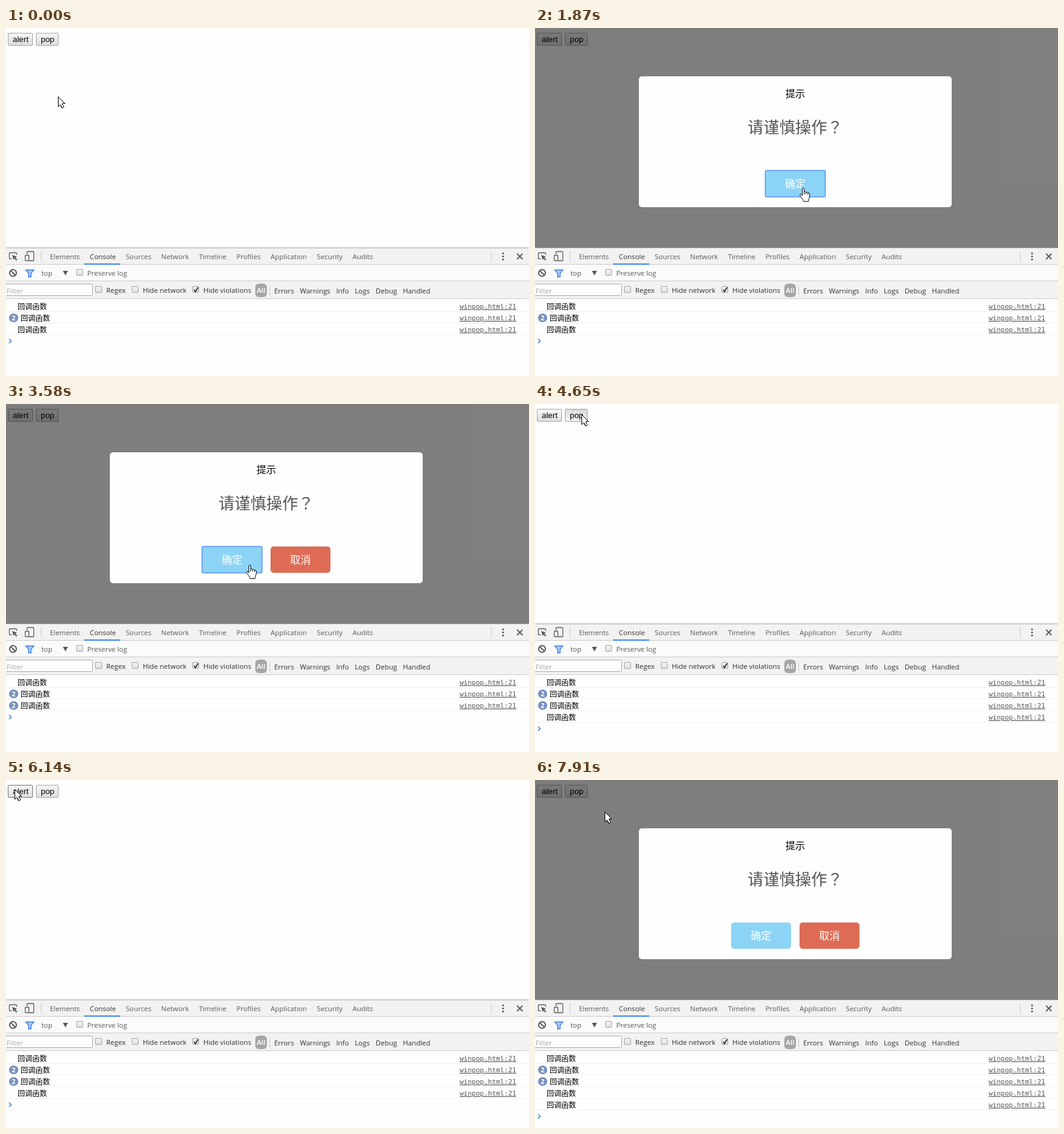
Write an HTML page that moves like this. It is 856 px wide and 569 px high and loops after 8000 ms.

```html
<!DOCTYPE html>
<html lang="zh-CN">
<head>
<meta charset="utf-8">
<title>winpop</title>
<style>
  html, body { margin: 0; width: 100%; height: 100%; overflow: hidden; background: #fefefe; }
  svg { display: block; }
  text { font-family: "Open Sans", sans-serif; font-size: 11.4px; fill: #303030; white-space: pre; }
  .muted { fill: #5a5a5a; }
  .on { fill: #333; }
  .btn text { font: 13.33px "Liberation Sans", Arial, sans-serif; fill: #000; }
  .btn rect { fill: url(#up); stroke: #a3a3a3; }
  .btn.hover rect { stroke: #707070; }
  .btn.down rect { fill: url(#down); stroke: #9a9a9a; }
  .cjk, .dialog text { font-family: "Noto Sans CJK SC", "Noto Sans CJK", sans-serif; }
  .cjk { font-size: 12px; fill: #000; }
  .dialog text { text-anchor: middle; font-size: 17px; fill: #fff; }
  .dialog .title { font-size: 16px; fill: #000; }
  .dialog .body { font-size: 26px; fill: #555; }
  .wide { font-family: "Noto Sans CJK JP", "Noto Sans CJK", sans-serif; }
  .ring { fill: none; stroke: #6ea6f5; stroke-width: 2; }
  .link { font: 11px "DejaVu Sans Mono", monospace; fill: #555; text-decoration: underline; }
  .badge { font-weight: 700; font-size: 11px; fill: #fff; text-anchor: middle; }
  .icon { fill: none; stroke: #5a5a5a; }
  .line { stroke: #ccc; }
</style>
</head>
<body>
<svg width="856" height="569" viewBox="0 0 856 569">
  <defs>
    <linearGradient id="up" x2="0" y2="1"><stop stop-color="#f6f6f6"/><stop offset="1" stop-color="#dedede"/></linearGradient>
    <linearGradient id="down" x2="0" y2="1"><stop stop-color="#dadada"/><stop offset="1" stop-color="#f6f6f6"/></linearGradient>
  </defs>
  <rect width="856" height="569" fill="#fefefe"/>

  <g class="btn" id="alert"><rect x="3.5" y="8.5" width="40" height="20" rx="1.5"/><text x="11" y="23">alert</text></g>
  <g class="btn" id="pop"><rect x="49.5" y="8.5" width="36" height="20" rx="1.5"/><text x="57" y="23">pop</text></g>

  <g class="dialog" id="dialog">
    <rect width="856" height="359" fill="#000" fill-opacity=".5"/>
    <rect x="170" y="79" width="512" height="214" rx="5" fill="#fefefe"/>
    <text class="title" x="426" y="113">提示</text>
    <text class="body" x="426" y="172">请谨慎操作<tspan class="wide" lang="ja">？</tspan></text>
    <g id="ok">
      <rect width="98" height="43" y="233" rx="5" fill="#8cd4f5"/>
      <text x="49" y="261">确定</text>
      <rect class="ring" width="98" height="43" y="233" rx="2"/>
    </g>
    <g id="cancel" transform="translate(433)">
      <rect width="98" height="43" y="233" rx="5" fill="#de6c55"/>
      <text x="49" y="261">取消</text>
      <rect class="ring" width="98" height="43" y="233" rx="2"/>
    </g>
  </g>

  <g>
    <rect y="359" width="856" height="210" fill="#fefefe"/>
    <rect y="359" width="856" height="84" fill="#f2f2f2"/>
    <rect y="387" width="856" height="26" fill="#fbfbfb"/>
    <path class="line" d="M0 386.5H856M0 413.5H856M0 442.5H856M57.5 365V382M794.5 365V382M431.5 421V437"/>
    <path d="M0 359.5H856" stroke="#a3a3a3"/>
    <rect x="128" y="385" width="59" height="2" fill="#3f86e8"/>
    <path class="icon" stroke-width="1.3" d="M9 377.5H7.2Q5.5 377.5 5.5 376V369Q5.5 367.5 7 367.5H16Q17.5 367.5 17.5 369V371"/>
    <path d="M10 371L18 374 15.3 375.5 18.5 378.8 17 380.3 13.8 377 12.5 379.5Z" fill="#5a5a5a"/>
    <path class="icon" stroke-width="1.3" d="M34.5 370V366.5Q34.5 365.5 35.5 365.5H44.5Q45.5 365.5 45.5 366.5V379.5Q45.5 380.5 44.5 380.5H38"/>
    <rect class="icon" stroke-width="1.3" x="31.5" y="371.5" width="6" height="9" rx="1"/>
    <path d="M813.5 368.5v10.1" stroke="#5a5a5a" stroke-width="3.2" stroke-linecap="round" stroke-dasharray="0 5"/>
    <path class="icon" stroke-width="2" d="M836.5 369L845.5 378M845.5 369L836.5 378"/>
    <circle class="icon" stroke-width="2" cx="11.5" cy="400.5" r="5.5"/>
    <path class="icon" stroke-width="2" d="M7.5 396.5L15.5 404.5"/>
    <path d="M32.5 395.5H45.5L41 401V407H37V401Z" fill="#aecbf7" stroke="#3f86e8" stroke-width="1.5"/>
    <text class="muted" x="58" y="405">top</text>
    <path d="M93 397H101.5L97.2 404.5Z" fill="#5a5a5a"/>
    <rect x="-3.5" y="418.5" width="145" height="19" rx="2" fill="#fefefe" stroke="#a9a9a9"/>
    <text x="1" y="434" style="fill:#a9a9a9">Filter</text>
    <rect x="408" y="418" width="19" height="22" rx="6" fill="#a6a6a6"/>
    <text x="410.5" y="433" style="fill:#fff;font-weight:600">All</text>
    <g id="tools"></g>
    <g id="rows"></g>
    <path id="prompt" d="M5 508.5L8.5 512 5 515.5" fill="none" stroke="#3f86e8" stroke-width="1.7"/>
  </g>

  <g fill="#fff" stroke="#000" stroke-linejoin="round">
    <path id="arrow" shape-rendering="crispEdges" d="M.5.5V16.5L3.5 13.5 4.5 14.5 6.5 18.5H8.5L9.5 17.5 7.5 12.5V11.5H11.5Z"/>
    <path id="hand" d="M4.5 13V2Q4.5.5 6 .5T7.5 2V7Q9.5 5.8 10.5 7.5 12.5 6.5 13.5 8.5 16.5 8 16.5 11V15Q15 18 14.5 22.5H6.5Q6 19.5 1 13.5 0 10.5 2.5 10.5ZM7.5 7V11M10.5 7.5V11M13.5 8.5V11.5"/>
  </g>
</svg>
<script>
const LOOP = 8000, STEP = 130;
const $ = id => document.getElementById(id);
const show = (el, on) => { el.style.display = on ? "" : "none"; };

function add(parent, tag, attrs, text) {
  const el = document.createElementNS("http://www.w3.org/2000/svg", tag);
  for (const k in attrs) el.setAttribute(k, attrs[k]);
  if (text) el.textContent = text;
  return parent.appendChild(el);
}

// A run of words, each set a fixed gap after the one before
function menu(x, y, gap, names, cls) {
  const line = add($("tools"), "text", { x, y, class: cls });
  names.split(" ").forEach((name, i) =>
    add(line, "tspan", { dx: i ? gap : 0, class: name === "Console" ? "on" : "" }, name));
}

function checkbox(x, y, label, cls = "", checked = false) {
  const g = add($("tools"), "g", { transform: `translate(${x} ${y})` });
  add(g, "rect", { x: .5, y: .5, width: 10, height: 10, rx: 1.5, fill: "url(#up)", stroke: "#a3a3a3" });
  if (checked) add(g, "path", { d: "M3 6L5 9 9.5 2", fill: "none", stroke: "#333", "stroke-width": 2 });
  add(g, "text", { x: 18, y: 11, class: cls }, label);
}

menu(72, 378, 16.2, "Elements Console Sources Network Timeline Profiles Application Security Audits", "muted");
menu(439, 434, 9.6, "Errors Warnings Info Logs Debug Handled", "");
checkbox(115, 394, "Preserve log", "muted");
checkbox(146, 422, "Regex");
checkbox(206, 422, "Hide network");
checkbox(305, 422, "Hide violations", "", true);

// Dialogs: when opened, pressed and closed; cancel marks the two-button kind
const dialogs = [
  { open: 1100, press: 1870, close: 2030 },
  { open: 3060, press: 3580, close: 3720, cancel: true },
  { open: 4770, press: 5330, close: 5470, cancel: true },
  { open: 6290, press: 6810, close: 6940 },
  { open: 7780, press: LOOP, close: LOOP, cancel: true }
];

// Console lines: when each appears and when its repeat badge does
const rows = [{}, { repeat: 0 }, { repeat: dialogs[0].close }, { from: dialogs[1].close }, { from: dialogs[3].close }]
  .map(({ from = 0, repeat = LOOP }, i) => {
    const g = add($("rows"), "g", { transform: `translate(0 ${455 + 19 * i})` });
    const badge = add(g, "g", {});
    add(badge, "rect", { x: 5, y: -7, width: 15, height: 14, rx: 7, fill: "#7790bc" });
    add(badge, "text", { x: 12.5, y: 4, class: "badge" }, "2");
    const msg = add(g, "text", { y: 4.5, class: "cjk" }, "回调函数");
    add(g, "text", { x: 742.5, y: 4, class: "link" }, "winpop.html:21");
    add(g, "path", { d: "M0 8.5H856", stroke: "#f0f0f0" });
    return { from, repeat, g, badge, msg };
  });

// Pointer trips: arrival time, x, y and travel time (a single hop if left out)
const trips = [
  [0, 85, 112], [130, 44, 33], [280, 32, 21], [950, 40, 25],
  [1870, 438, 261, 770], [2170, 430, 301], [2810, 39, 32, 640], [2930, 64, 15],
  [3580, 398, 263, 520], [3870, 214, 86], [4000, 214, -20],
  [4260, 88, -6], [4650, 76, 17, 390], [5030, 534, 262, 260], [5330, 489, 246, 300], [5610, 489, -20],
  [5870, -10, 7], [6140, 14, 15, 270], [6670, 431, 260, 380],
  [7360, 53, 24, 420], [7640, 62, 27, 260], [7910, 114, 52]
];
const ease = p => p * p * (3 - 2 * p);

function pointer(t) {
  let x, y;
  for (const [end, x1, y1, time = STEP] of trips) {
    const steps = Math.floor((t - end + time) / STEP);
    if (t < end && steps <= 0) break;
    const p = t >= end ? 1 : ease(steps * STEP / time);
    x = p === 1 ? x1 : Math.round(x + (x1 - x) * p);
    y = p === 1 ? y1 : Math.round(y + (y1 - y) * p);
  }
  return [x, y];
}

function draw(t) {
  const [x, y] = pointer(t);
  const within = (x0, y0, w, h) => x >= x0 && x < x0 + w && y >= y0 && y < y0 + h;

  const box = dialogs.find(d => t >= d.open && t < d.close);
  const next = dialogs.find(d => t < d.open);
  show($("dialog"), box);
  let hand = false;
  if (box) {
    const okX = box.cancel ? 321 : 377;
    const overOk = within(okX, 233, 98, 43), overCancel = box.cancel && within(433, 233, 98, 43);
    $("ok").setAttribute("transform", `translate(${okX})`);
    show($("cancel"), box.cancel);
    show($("ok").lastElementChild, t >= box.press && overOk);
    show($("cancel").lastElementChild, t >= box.press && overCancel);
    hand = overOk || overCancel;
  }

  const overPop = !box && within(49, 8, 37, 21);
  $("alert").classList.toggle("hover", !box && within(3, 8, 41, 21));
  $("pop").classList.toggle("hover", overPop);
  $("pop").classList.toggle("down", overPop && next && t >= next.open - STEP);

  for (const r of rows) {
    show(r.g, t >= r.from);
    show(r.badge, t >= r.repeat);
    r.msg.setAttribute("x", t >= r.repeat ? 24 : 19);
  }
  const count = rows.filter(r => t >= r.from).length;
  $("prompt").setAttribute("transform", `translate(0 ${19 * (count - 3)})`);

  show($("arrow"), !hand);
  show($("hand"), hand);
  $("arrow").setAttribute("transform", `translate(${x} ${y})`);
  $("hand").setAttribute("transform", `translate(${x - 5} ${y})`);
}

const start = performance.now();
function tick() {
  draw((performance.now() - start) % LOOP);
  requestAnimationFrame(tick);
}
tick();
</script>
</body>
</html>
```
